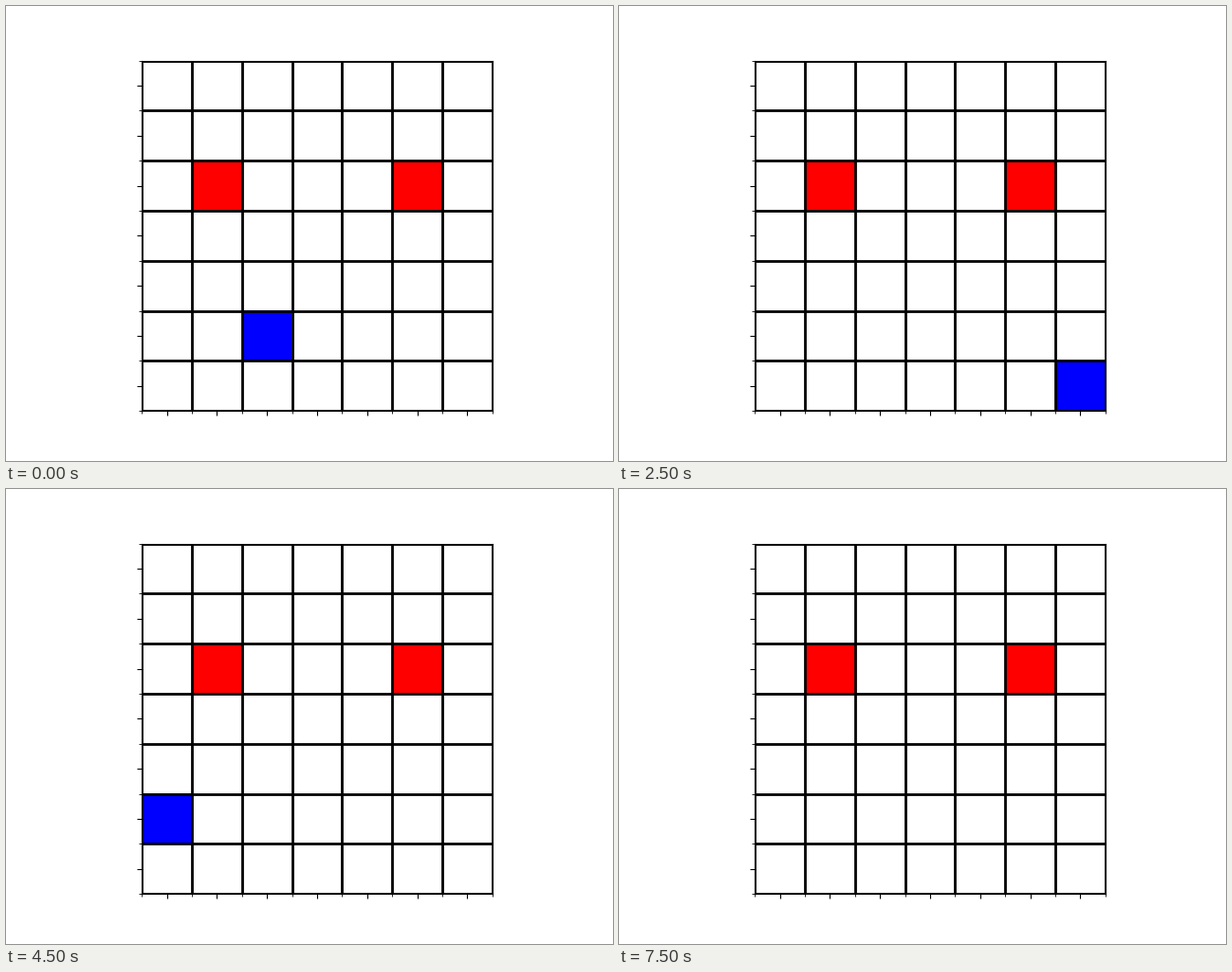
Recreate the animation shown at these times as a matplotlib script. Size 640 px wide and 480 px high, loop 8 s.

```python
import matplotlib.pyplot as plt
import numpy as np
from matplotlib.animation import FuncAnimation

SIZE = 7
STEP_MS = 500
FRAMES = 16
WHITE, RED, BLUE = (255, 255, 255), (255, 0, 0), (0, 0, 255)
START = (5, 2)
# one compass move per second; the board wraps around at its edges
MOVES = "SSSEEE NE N N E W E".split()


def walker_cell(step):
    """Cell reached after the given number of moves, None once the walk is over."""
    if step > len(MOVES):
        return None
    trail = "".join(MOVES[:step])
    row = START[0] + trail.count("S") - trail.count("N")
    col = START[1] + trail.count("E") - trail.count("W")
    return row % SIZE, col % SIZE


def board(step):
    grid = np.full((SIZE, SIZE, 3), WHITE, dtype=np.uint8)
    cell = walker_cell(step)
    if cell is not None:
        grid[cell] = BLUE
    grid[2, [1, -2]] = RED
    return grid


fig, ax = plt.subplots(figsize=(6.4, 4.8), dpi=100)
image = ax.imshow(board(0), interpolation="nearest")

for axis in (ax.xaxis, ax.yaxis):
    axis.set_ticks(np.arange(SIZE))
    axis.set_ticks(np.arange(SIZE + 1) - 0.5, minor=True)
    axis.set_ticklabels([])
ax.grid(which="minor", color="black", linestyle="-", linewidth=2)


def update(frame):
    # moves fall on the half second
    image.set_data(board((frame + 1) * STEP_MS // 1000))
    return [image]


anim = FuncAnimation(fig, update, frames=FRAMES, interval=STEP_MS,
                     repeat=True, repeat_delay=0)
plt.show()
```
